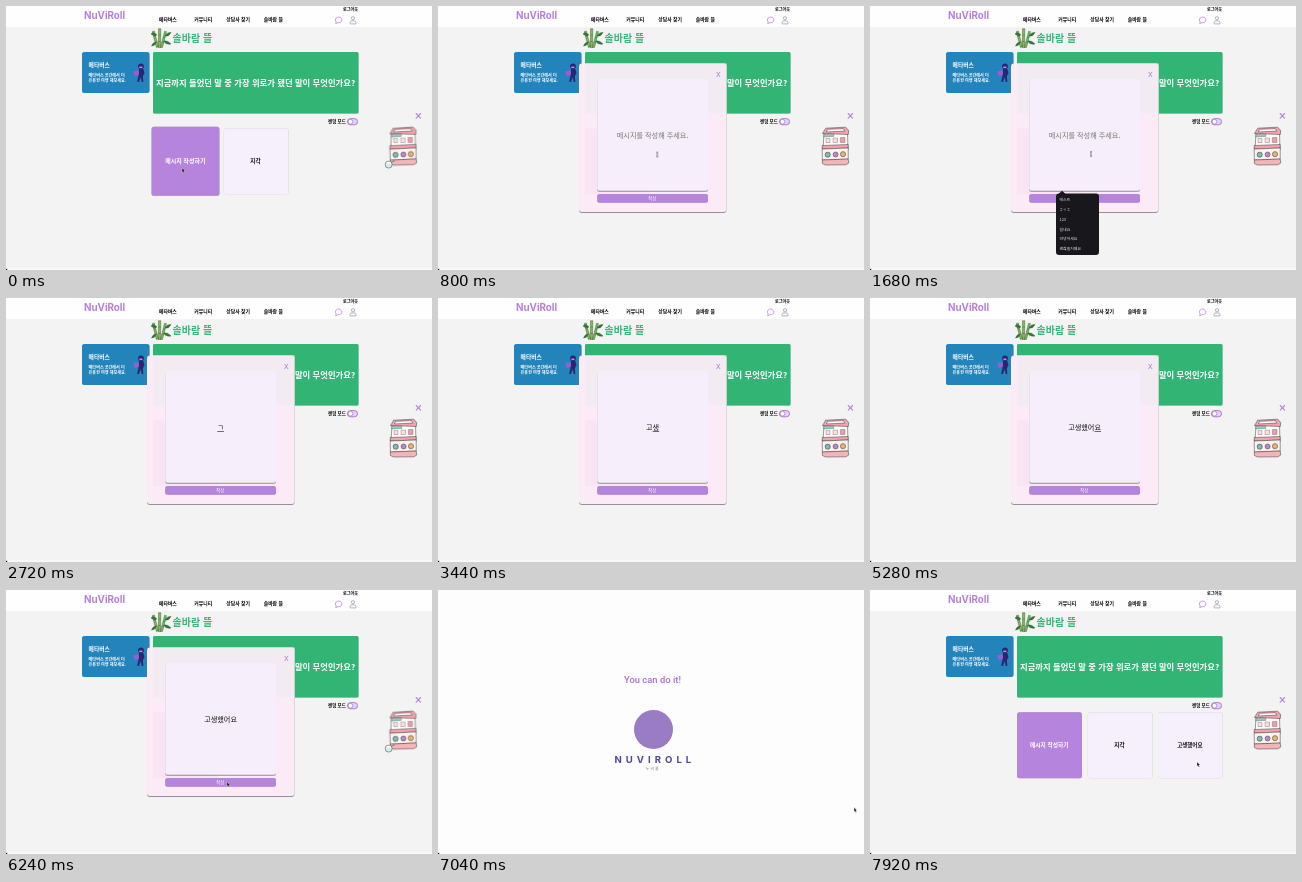
Recreate the animation shown at these times as an HTML page. Size 426x264 px, loop 8000 ms.

```html
<!DOCTYPE html>
<html lang="ko">
<head>
<meta charset="utf-8">
<title>메시지 작성</title>
<style>
  html, body { margin: 0; width: 100%; height: 100%; overflow: hidden; background: #f2f2f2; }
  svg { display: block; width: 100vw; height: 100vh; }
  text { font-family: "Noto Sans CJK KR", "Noto Sans CJK", sans-serif; font-weight: 500; }
  .mid { text-anchor: middle; }
  .bold, .bold text { font-weight: 700; }
  .latin { font-family: Inter, sans-serif; font-weight: 700; }
  .line { fill: none; stroke: #b585dd; stroke-linecap: round; }
  .ink { stroke: #3d3540; stroke-width: .5; stroke-linejoin: round; }
  .card { filter: drop-shadow(.2px .5px .4px #0004); }
  .raised { filter: drop-shadow(.8px 1px .6px #0006); }

  .timed { animation: 8s step-end infinite; }
  #modal { animation-name: modal; }
  #menu { animation-name: menu; }
  #hint { animation-name: hint; }
  #splash { animation-name: splash; }
  #reply { animation-name: reply; }
  #beam { animation-name: beam; }
  #arrow { animation-name: arrow; }
  #pointer { animation: travel 8s ease-in-out infinite; }
  #write { transform-origin: 179.5px 155.3px; animation: hover 8s ease-out infinite; }
  #machine { transform-origin: 398px 159px; animation: shake 2s step-end infinite; }
  #ball { animation: drop 2s step-end infinite; }

  @keyframes modal { 0%, 79% { visibility: hidden } 5% { visibility: visible } }
  @keyframes menu { 0%, 33.8% { visibility: hidden } 14% { visibility: visible } }
  @keyframes hint { 0%, 33.8% { visibility: hidden } 5% { visibility: visible } }
  @keyframes splash { 0%, 91% { visibility: hidden } 79% { visibility: visible } }
  @keyframes reply { 0% { visibility: hidden } 79%, 100% { visibility: visible } }
  @keyframes beam { 0%, 33.8% { visibility: hidden } 8% { visibility: visible } }
  @keyframes arrow { 0%, 68% { visibility: visible } 8% { visibility: hidden } }
  @keyframes travel {
    0%, 4% { transform: translate(176px, 162px) }
    11%, 68% { transform: translate(221px, 148px) }
    74%, 79% { transform: translate(221px, 192px) }
    82.5%, 89% { transform: translate(416px, 217.5px) }
    96%, 100% { transform: translate(327px, 172px) }
  }
  @keyframes hover { 0%, 5% { transform: scale(1.045) } 7.5%, 100% { transform: none } }
  @keyframes shake { 0% { transform: rotate(-1deg) } 25%, 100% { transform: none } }
  @keyframes drop { 0% { visibility: visible } 25%, 100% { visibility: hidden } }
</style>
</head>
<body>
<svg viewBox="0 0 426 264" preserveAspectRatio="none">
  <rect width="426" height="264" fill="#f3f3f3"/>
  <rect width="426" height="21" fill="#fefefe"/>
  <rect y="262.5" width="426" height="1.5" fill="#fbfbfb"/>

  <!-- Header -->
  <text class="latin" x="78" y="12.7" font-size="9.8" fill="#b77fdb">NuViRoll</text>
  <g class="bold" font-size="4.85" fill="#000">
    <text x="153" y="15.2">메타버스</text>
    <text x="188.3" y="15.2">커뮤니티</text>
    <text x="220.3" y="15.2">상담사 찾기</text>
    <text x="257.7" y="15.2">솔바람 뜰</text>
    <text x="337" y="4.5" font-size="4.1">로그아웃</text>
  </g>
  <path class="line" stroke-width=".8" d="M329.8 17.4l.2-1.8a3.2 2.9 0 1 1 2 1.2z"/>
  <g class="line" stroke-width=".8" style="stroke:#a99ab8">
    <circle cx="347" cy="12.2" r="1.6"/>
    <path d="M344 17.5v-.8a3 2 0 0 1 6 0v.8z"/>
  </g>

  <!-- Title -->
  <g stroke="#27542c" stroke-width=".4">
    <g fill="#86b45a">
      <path d="M146.3 25.5l2-.5l4.2 16l-2.2.4z M152.5 22.7h2.3l-.3 18.8h-2.2z M158.5 25.2l2 .5l-4 15.8h-2z"/>
      <path fill="none" d="M147.6 30.5l2.2-.5M149.2 36.4l2.2-.5M152.4 29h2.3M152.3 35.5h2.3M157.2 31l2 .4M155.6 36.5l2 .4"/>
    </g>
    <path fill="#2f7f3d" d="M151 29q-4-4-6-1q3 3 6 1zM159 30q2-4 6-3.5q-2 4.5-6 3.5zM157.5 35q4-1 7.5 3q-5 1-7.5-3zM150 36q-3 0-4.5 4q4 0 4.5-4z"/>
  </g>
  <text class="bold" x="166.5" y="36" font-size="10" fill="#38b677">솔바람 뜰</text>

  <!-- Side card -->
  <g class="card">
    <rect x="76" y="46" width="67.5" height="41" rx="2.5" fill="#2383bb"/>
    <g class="bold" fill="#fff">
      <text x="82.6" y="61.4" font-size="5.8">메타버스</text>
      <text x="82.6" y="71" font-size="4.1">메타버스 공간에서 더</text>
      <text x="82.6" y="75.6" font-size="4.1">유용한 여행 해보세요.</text>
    </g>
    <g fill="#2b2470">
      <circle cx="135" cy="60.3" r="2.9"/>
      <path d="M133 63h4.3l1.2 4l-1.6 3.2l.4 5.8h-1.6l-.8-5l-2 5h-1.8l1.4-6z"/>
    </g>
    <path fill="#8f62cf" d="M127 65.2l5.6-1.2l.6 4.2l-4.6 2z"/>
    <path fill="#b78fdc" d="M133.4 60.5h3v1.6h-3z"/>
  </g>

  <!-- Question -->
  <rect class="card" x="147" y="46" width="205.5" height="61.5" rx="1.5" fill="#32b574"/>
  <text class="mid bold" x="249.6" y="79.7" font-size="8.33" fill="#fff">지금까지 들었던 말 중 가장 위로가 됐던 말이 무엇인가요?</text>
  <text class="bold" x="322" y="117.4" font-size="4.5" fill="#000">랜덤 모드</text>
  <rect x="341.4" y="112.6" width="10.2" height="6.2" rx="3.1" fill="#e4d0f4" stroke="#9c67c9" stroke-width=".8"/>
  <circle cx="344.5" cy="115.7" r="2.3" fill="#fff" stroke="#9c67c9" stroke-width=".6"/>

  <!-- Cards -->
  <g id="write">
    <rect class="card" x="147" y="122.3" width="65" height="66" rx="2.5" fill="#b585dd"/>
    <text class="mid bold" x="179.3" y="157" font-size="5.75" fill="#fff">메시지 작성하기</text>
  </g>
  <rect class="card" x="217.8" y="122.3" width="64.7" height="66" rx="2.5" fill="#f6effc"/>
  <text class="mid bold" x="249.5" y="157" font-size="5.6" fill="#111">지각</text>
  <g id="reply" class="timed">
    <rect class="card" x="288" y="122.3" width="64.7" height="66" rx="2.5" fill="#f6effc"/>
    <text class="mid bold" x="319.8" y="157" font-size="5.5" fill="#111">고생했어요</text>
  </g>

  <!-- Vending machine -->
  <path class="line" stroke-width="1.1" d="M410.2 107.5l4.4 4.6m0-4.6l-4.4 4.6"/>
  <g id="machine" class="ink">
    <path fill="#fff" d="M386 127h23.5l.5 17h-25z"/>
    <path fill="#f2a3ab" d="M384.5 127.5l3.2-5.3l20-1l3 3.3l-.4 4z"/>
    <path fill="#fff" d="M389.5 123.3l16-.6l1.2 2.4l-18.2.8z"/>
    <path fill="#8fcfc3" stroke-width=".3" d="M385.8 128.5l10-.3v2.2l-10 .6z"/>
    <path fill="#fbe0da" stroke-width=".3" d="M388 132.5h4v4h-4zM395 132h4.5v4.5H395z"/>
    <path fill="#ef9ca5" stroke-width=".3" d="M402.5 131.5h4.5v5h-4.5z"/>
    <path fill="#f2a3ab" d="M384.2 139.5l26-1v3.5l-26 1z"/>
    <path fill="#fdf3ee" d="M384.2 143l26-1v11l-25.8 1z"/>
    <circle cx="389.7" cy="148.7" r="2.6" fill="#7fb9b2"/>
    <circle cx="397.6" cy="148.5" r="2.5" fill="#b98bc5"/>
    <circle cx="405" cy="148.2" r="2.6" fill="#e9b36d"/>
    <path fill="#f4b4b8" d="M384.4 154l25.8-1l.6 4l-3 1.8l-20.4.2l-3-1.5z"/>
  </g>
  <g id="ball" class="ink">
    <path fill="none" d="M385.6 156.2l3-1.6"/>
    <circle cx="382.7" cy="158.6" r="3.5" fill="#cfeee6"/>
    <path fill="#fff" stroke="none" d="M380 157.8a2.8 2.8 0 0 1 5.4 0z"/>
  </g>

  <!-- Dialog -->
  <g id="modal" class="timed">
    <rect class="raised" x="141" y="57.5" width="147.5" height="148.5" rx="3" fill="#fbebf7"/>
    <rect x="147" y="57.5" width="141.5" height="50" fill="#f3ebf2"/>
    <rect x="147" y="122.3" width="65" height="66" fill="#f9e4f6"/>
    <text class="mid latin" x="280.4" y="71.2" font-size="6.6" fill="#b07fd6" style="font-weight:500">X</text>
    <rect class="raised" x="159.2" y="73.2" width="110.8" height="111.6" rx="2" fill="#f6effb"/>
    <rect class="card" x="159.2" y="188" width="110.8" height="8.7" rx="2.5" fill="#b585dd"/>
    <text class="mid" x="214.3" y="193.7" font-size="4.3" fill="#fff">작성</text>
    <text id="typed" class="mid" x="214.6" y="132" font-size="7.15" fill="#111"></text>
    <rect id="underline" y="133" height=".7" fill="#333"/>
  </g>
  <text id="hint" class="timed mid" x="214.6" y="132" font-size="7.15" fill="#777">메시지를 작성해 주세요.</text>
  <g id="menu" class="timed">
    <path fill="#17171c" d="M188.5 188l3.5-3.2l3.5 3.2z"/>
    <rect x="186" y="187.5" width="43" height="61.5" rx="3" fill="#17171c"/>
    <g font-size="3.9" fill="#e6e6e8">
      <text x="189.5" y="195.3">테스트</text>
      <text x="189.5" y="205">ㅎㅇㅎ</text>
      <text x="189.5" y="214.8">123</text>
      <text x="189.5" y="224.5">힘내요</text>
      <text x="189.5" y="234.3">안녕하세요</text>
      <text x="189.5" y="244">괜찮을거예요</text>
    </g>
  </g>

  <!-- Sending screen -->
  <g id="splash" class="timed">
    <rect width="426" height="264" fill="#fdfdfd"/>
    <text class="mid" x="214.5" y="93" font-size="9.4" fill="#a971cb" style="font-family:Roboto,sans-serif">You can do it!</text>
    <circle cx="215.5" cy="139.5" r="19.5" fill="#9a7cc4"/>
    <text class="latin" x="176.5" y="173" font-size="9.6" letter-spacing="4" fill="#4d4795">NUVIROLL</text>
    <text class="mid" x="214.8" y="179.6" font-size="3.6" letter-spacing="1.4" fill="#77729c">누비롤</text>
  </g>

  <g id="pointer">
    <path id="arrow" class="timed" fill="#111" stroke="#fff" stroke-width=".3" d="M0 0v4.3l1-.9l.8 1.7l.8-.4l-.8-1.6h1.3z"/>
    <path id="beam" class="timed" fill="none" stroke="#333" stroke-width=".6" d="M-.9-2.2h1.8M0-2.2v4.4M-.9 2.2h1.8"/>
  </g>
  <rect y="262.8" width="1.2" height="1.2" fill="#111"/>
</svg>
<script>
  const typed = document.getElementById("typed");
  const underline = document.getElementById("underline");
  const clock = document.getElementById("modal").getAnimations()[0];
  const fontSize = 7.15;
  const syllable = fontSize * 0.92;

  const keys = [
    [0, ""], [2700, "ㄱ"], [2860, "고"], [3020, "곳"], [3180, "고새"], [3260, "고생"],
    [3420, "고생ㅎ"], [3580, "고생해"], [3740, "고생했"], [3900, "고생했ㅇ"],
    [3980, "고생했에"], [4140, "고생했엥"], [4380, "고생했에"], [4540, "고생했ㅇ"],
    [4700, "고생했어"], [4940, "고생했엉"], [5100, "고생했어요"]
  ];

  function draw() {
    const now = (clock.currentTime || 0) % 8000;
    const value = keys.findLast(([start]) => start <= now)[1];
    if (typed.textContent !== value) typed.textContent = value;
    underline.setAttribute("x", 214.6 + (value.length / 2 - 1) * syllable);
    underline.setAttribute("width", value && now < 5700 ? syllable : 0);
    requestAnimationFrame(draw);
  }
  draw();
</script>
</body>
</html>
```
